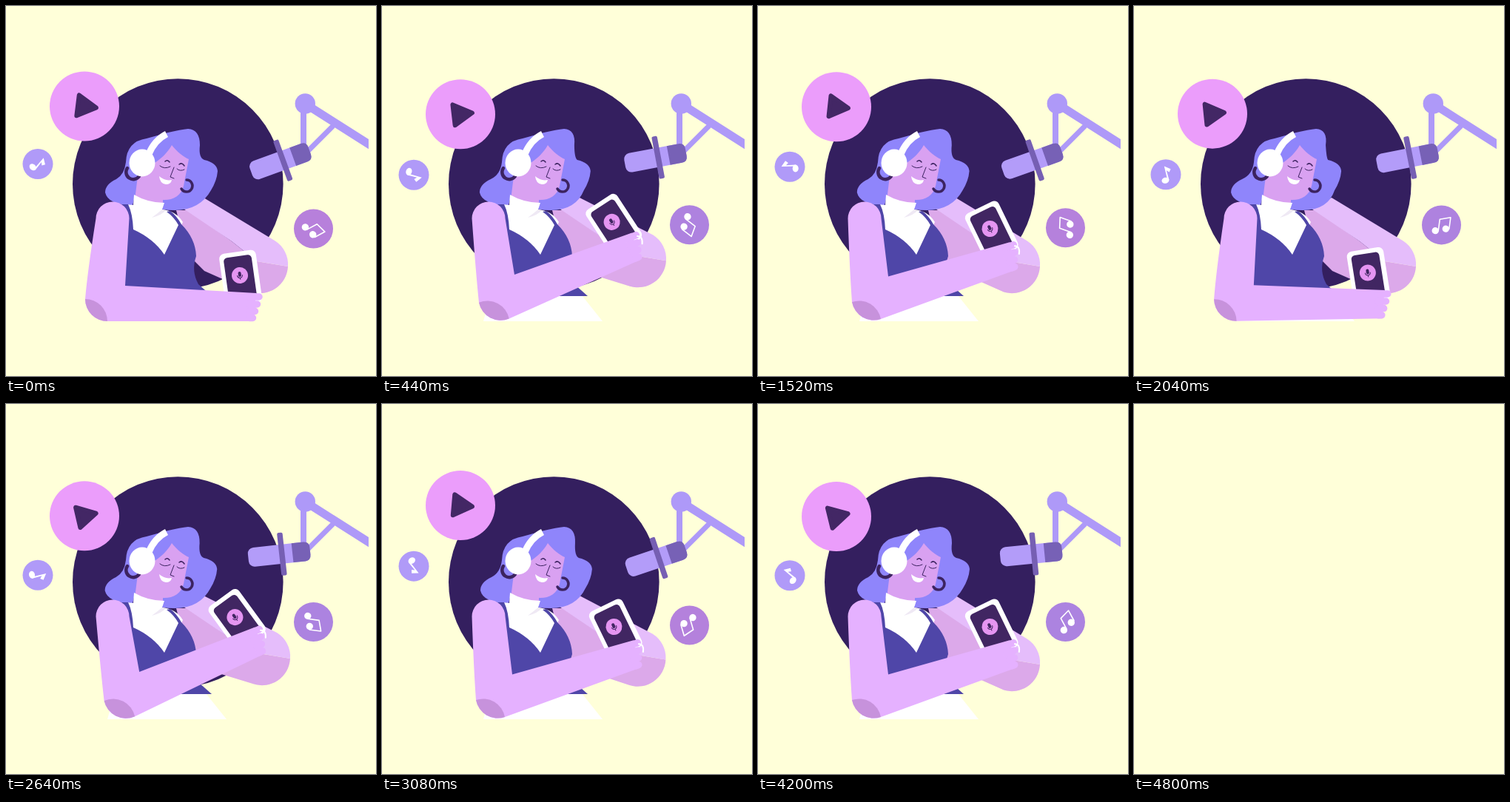
An HTML page that plays this animation: 500 by 500 pixels, repeating every 4840 ms.

```html
<!DOCTYPE html>
<html lang="en">
<head>
<meta charset="utf-8">
<title>Podcast listener</title>
<style>
  html, body { margin: 0; width: 100%; height: 100%; overflow: hidden; background: #ffffd9; }
  svg { display: block; width: 100vw; height: 100vh; }
  .line { fill: none; stroke-linecap: round; stroke-linejoin: round; }
</style>
</head>
<body>
<svg viewBox="0 0 500 500">
  <clipPath id="edge"><rect width="490" height="500"/></clipPath>
  <g id="scene">
    <circle cx="232.300" cy="240.500" r="142.300" fill="#341f5f"/>

    <!-- microphone stand -->
    <g clip-path="url(#edge)" class="line" stroke="#ae99f8">
      <path d="M402 132V194" stroke-width="8"/>
      <path d="M441 163L406 198" stroke-width="7"/>
      <path d="M404 132L504 195.500" stroke-width="11"/>
      <circle cx="404.300" cy="132" r="13.700" fill="#ae99f8" stroke="none"/>
    </g>
    <g id="mic">
      <rect x="-71" y="-13" width="84" height="26" rx="8" fill="#b39cf9"/>
      <path d="M-11-13H5Q13-13 13-5V5Q13 13 5 13H-11Z" fill="#7761b6"/>
      <rect x="-29" y="-29" width="7.500" height="58" rx="2" fill="#765fb3"/>
    </g>

    <!-- floating badges -->
    <g id="play">
      <circle r="47" fill="#eb9dfb"/>
      <path id="tri" d="M-9-14V14L16 0Z" fill="#432765" stroke="#432765" stroke-width="6" stroke-linejoin="round"/>
    </g>
    <g id="single">
      <circle r="20.500" fill="#b09af8"/>
      <g id="singleNote" fill="#fff">
        <ellipse cy="8" rx="5" ry="4" transform="rotate(-15 0 8)"/>
        <path d="M3 8L5 7L.500-5.500L4.500-3.500L6-8L-3-11Z"/>
      </g>
    </g>
    <g id="pair">
      <circle id="pairDisc" r="26.500"/>
      <g id="pairNote">
        <g fill="#fff"><circle cx="-8" cy="8" r="4.700"/><circle cx="6" cy="5" r="4.700"/></g>
        <path class="line" d="M-4 8L-2.500-7.500L12-10.500L10.500 5" stroke="#fff" stroke-width="1.600"/>
      </g>
    </g>

    <!-- body -->
    <path id="rearUpper" fill="#dca9ea"/>
    <path id="rearFore" fill="#e5bdfb"/>
    <path d="M137 426L147 391H270L298 426Z" fill="#fff"/>
    <path id="hair" fill="#8f85fb"/>
    <path d="M224 188C231 197 240 204 247 207L240 243C237 257 224 263 212 262L212 270L174 262L178 230C190 216 212 210 224 188Z" fill="#d9a1f1"/>
    <path d="M173 255Q192 266 214 266L211 275Q230 277 239 292L216 340L170 308L163 268L172 269Z" fill="#fff"/>
    <path d="M197 286Q210 283 216 276L211 275Q205 280 197 286Z" fill="#efe9f4"/>
    <path d="M155 268H165Q171 280 172 302Q199 314 214 336L233 296Q227 285 217 278L222 277Q231 284 237 295Q256 314 257 338Q250 358 260 376L278 392H146Z" fill="#4f46a8"/>

    <!-- head -->
    <g class="line" stroke="#3c2360">
      <path d="M164 219A9 9 0 1 0 180 230" stroke-width="4.500"/>
      <path d="M244 235A8 8 0 1 1 237 247" stroke-width="3.500"/>
      <path d="M208 216Q214 221 222 217M231 220Q235 224 241 221M227 218L222 231L227 233" stroke-width="1"/>
      <path d="M215 210Q218 207 221 211M234 214Q238 211 241 216" stroke-width="1.500"/>
    </g>
    <path d="M207 230Q215 237 224 235Q223 241 216 241Q208 240 207 230Z" fill="#fff"/>
    <path class="line" d="M193 200Q201 181 217 173" stroke="#fff" stroke-width="9" style="stroke-linecap:butt"/>
    <ellipse cx="184" cy="212" rx="17.500" ry="18.500" fill="#fff"/>

    <!-- phone and front arm -->
    <g id="phone">
      <rect x="-24.500" y="-32" width="50" height="72" rx="7" fill="#fff"/>
      <rect x="-19" y="-26" width="38" height="60" rx="5" fill="#412662"/>
      <circle r="11" fill="#e595f1"/>
      <rect x="-2" y="-5" width="4" height="7" rx="2" fill="#412662"/>
      <path class="line" d="M-3.500 0Q-3 3.500 0 3.500Q3 3.500 3.500 0M0 3.500V5.500" stroke="#412662" stroke-width="1"/>
    </g>
    <path id="arm" fill="#e5b1ff"/>
    <path id="elbow" fill="#c792dc"/>
    <g id="hand">
      <path class="line" d="M195-9H208M195 1H205.500M195 10.500H202.500M195 19.500H199.500" stroke="#e5b1ff" stroke-width="9.500"/>
      <path id="rim" class="line" d="M209-7Q216-4 211 5" stroke="#fff" stroke-width="2"/>
    </g>
  </g>
</svg>
<script>
const LOOP = 4840, SHOWN = 4800;
const el = {};
document.querySelectorAll('[id]').forEach(e => el[e.id] = e);

const smooth = x => x * x * (3 - 2 * x);
const set = (id, name, value) => el[id].setAttribute(name, value);
const place = (id, x, y, deg = 0) => set(id, 'transform', `translate(${x} ${y}) rotate(${deg})`);

// Eased value from a list of [time, value] stops.
function ease(stops, t) {
  const i = Math.max(1, stops.findIndex(s => s[0] > t));
  const [t0, v0] = stops[i - 1], [t1, v1] = stops[i];
  return v0 + (v1 - v0) * smooth((t - t0) / (t1 - t0));
}

const FRONT = [[0, 0], [520, 1.28], [900, 1], [1680, 1], [2100, 0], [2120, 0],
  [2640, 1.28], [3020, 1], [4420, 1], [4801, 0]];
const REAR = [[0, 0], [480, 1], [800, 1], [1360, 0], [2120, 0],
  [2600, 1], [2920, 1], [3480, 0], [4801, 0]];
const BEATS = [0, 1620, 3230, 4801];

function badges(t) {
  const i = BEATS.findIndex(b => b > t);
  const phase = (t - BEATS[i - 1]) / (BEATS[i] - BEATS[i - 1]);
  const bob = (1 - Math.cos(2 * Math.PI * phase)) / 2;
  const hop = Math.sin(Math.PI * phase);
  const spin = t * 0.15;
  place('play', 106, 135.5 + 19 * bob);
  place('tri', 0, 0, 7 - 24 * bob);
  place('mic', 398, 200, -20 + 16.5 * bob);
  place('single', 43, 213.5 + 19.5 * hop);
  place('singleNote', 0, 0, 58 + spin);
  place('pair', 415.5, 301 - 7 * hop);
  place('pairNote', 0, 0, 56 + spin);
  set('pairDisc', 'fill', `rgb(${183 - 12 * hop},${128 + 3 * hop},${219 + 5 * hop})`);
}

function hair(t) {
  const d = 3 * Math.cos(2 * Math.PI * t / 1400) - 3, l = d / 2;
  set('hair', 'd', `M219 171Q236 167 246 166Q262 167 ${262 + l} 188Q260 205 ${268 + d} 208
    Q${285 + d} 212 ${286 + d} 223Q${285 + d} 236 ${277 + d} 249Q262 276 228 276
    Q208 276 200 271L174 258L171 269Q${138 + l} 269 ${134 + l} 252Q${134 + l} 241 ${149 + l} 234
    Q160 228 162 211Q163 183 190 179Z`);
}

function rearArm(b) {
  const x = 343 + 3 * b, y = 350 - 8 * b, side = `${x + 38} ${y + 2}`, fold = `${x - 4} ${y - 5}`;
  set('rearFore', 'd', `M240 274L267 259L${x + 20} ${y - 33}A38 38 0 0 1 ${side}L${fold}L305 318Z`);
  set('rearUpper', 'd', `M230 276H246L305 318L${fold}L${side}A38 38 0 0 1 ${x - 11} ${y + 36.5}L268 358L245 335Z`);
}

function frontArm(a) {
  const ex = 134 + 18 * a, ey = 402 - 2 * a, deg = -19.3 * a, r = deg * Math.PI / 180;
  const at = (x, y) => `${ex + x * Math.cos(r) - y * Math.sin(r)} ${ey + x * Math.sin(r) + y * Math.cos(r)}`;
  const left = `${107 + 20 * a} ${396 + 4 * a}`, low = `${137 + 29 * a} ${426 - 3 * a}`;
  const over = Math.max(0, a - 1);
  set('arm', 'd', `M121.500 287A22.500 22.500 0 0 1 166.500 287L${161 + 15 * a} ${378 - 12.5 * a}
    L${at(204, -14)}L${at(200, 24)}L${low}A30 30 0 0 1 ${left}Q${110 + 14 * a} 360 121.500 287Z`);
  set('elbow', 'd', `M${left}A30 30 0 0 1 ${low}A30 30 0 0 1 ${left}Z`);
  place('hand', ex, ey, deg);
  set('rim', 'opacity', Math.min(1, Math.max(0, a * 3 - 2)));
  place('phone', 316 - 2.5 * a - 12 * over, 364 - 63 * a + 17 * over, -8 - 18 * a - 18 * over);
}

let start;
function draw(now) {
  start ??= now;
  const t = (now - start) % LOOP, on = t < SHOWN;
  el.scene.style.display = on ? '' : 'none';
  if (on) {
    badges(t);
    hair(t);
    rearArm(ease(REAR, t));
    frontArm(ease(FRONT, t));
  }
  requestAnimationFrame(draw);
}
requestAnimationFrame(draw);
</script>
</body>
</html>
```
